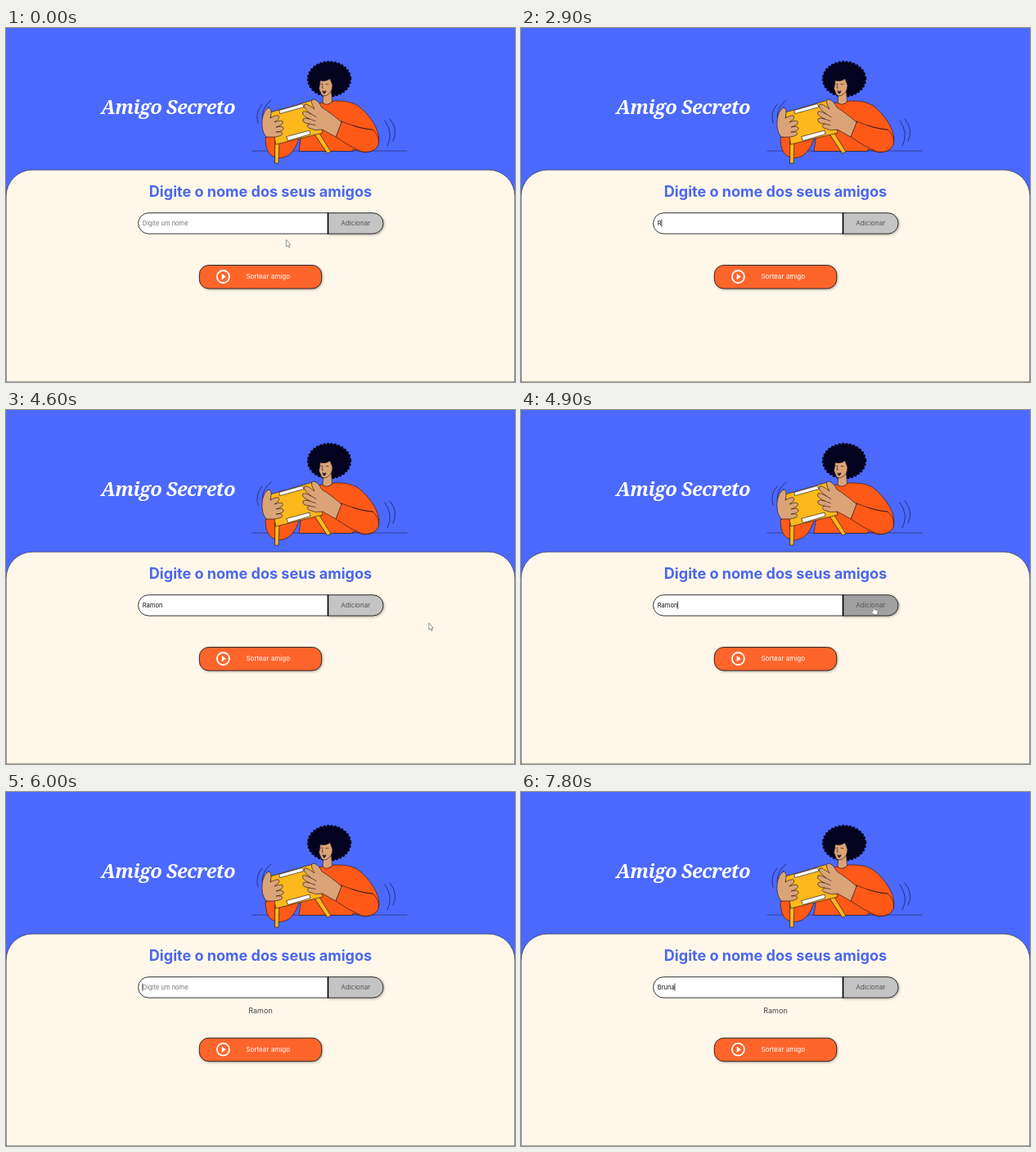
Write an HTML page that moves like this. It is 622x432 px and loops after 8 s.

```html
<!DOCTYPE html>
<html lang="pt-BR">
<head>
<meta charset="utf-8">
<title>Amigo Secreto</title>
<style>
  html, body { margin: 0; width: 100%; height: 100%; overflow: hidden; background: #4b69fd; }
  svg { display: block; width: 622px; height: 432px; }
  text { font-family: Inter, sans-serif; }
  .title { font: italic 800 23.6px "Noto Serif", serif; letter-spacing: -.6px; fill: #fff; }
  .heading { font-size: 18.05px; font-weight: 700; fill: #4a67ee; }
  .field { font-size: 7.55px; }
  .button { font-size: 8.05px; }
  .item { font-size: 9px; fill: #444; }
  .edge { stroke: #1c1c1c; stroke-width: .9; }
  .shadow { filter: drop-shadow(1px 1.5px 1.5px rgba(0, 0, 0, .3)); }
  .art { stroke: #24171f; stroke-width: .65; stroke-linejoin: round; stroke-linecap: round; }
  .line { fill: none; }
  .skin { fill: #dba477; }
  .shirt { fill: #ff5917; }
  .wood { fill: #fdb91b; }
  .hair { fill: #03031f; stroke: #03031f; }
</style>
</head>
<body>
<svg viewBox="0 0 622 432">
  <rect width="622" height="432" fill="#4b69fd"/>
  <text class="title" x="198" y="105" text-anchor="middle">Amigo Secreto</text>

  <g class="art">
    <path class="line" d="M301 150H490" stroke="#1c2663"/>
    <path class="line" stroke="#101545" d="M308 116Q304 103 313 93M313 110Q313 96 324 88M463 113Q474 128 466 144M469 111Q480 124 473 138"/>
    <!-- body and far sleeve -->
    <path class="shirt" d="M358 150L364 108Q374 93 386 91Q393 95 400 89Q418 88 429 94Q442 103 451 119Q458 133 455 141Q452 151 438 152L424 148V150Z"/>
    <path class="shirt" d="M317 134Q317 151 325 156Q334 161 344 156Q352 151 357 138L361 128L330 130Z"/>
    <!-- head -->
    <ellipse class="hair" cx="395" cy="62.300" rx="25.300" ry="20.300"/>
    <ellipse class="hair" cx="395" cy="62.300" rx="25.300" ry="20.300" fill="none" stroke-width="4" stroke-dasharray="0 4.4"/>
    <path class="skin" d="M388 79L387 91Q392 96 398.500 90L397.500 76Z"/>
    <path class="skin" d="M384 64Q390 66 396 62L399 70Q399 79 391 82.500Q386 84 384.500 79L382.500 74Q383.500 70 384 64Z"/>
    <path class="line" d="M384.800 68.500L387 68M391 68.500L394 68.700M387 69.500L386 73L387.500 73.500"/>
    <path d="M387 77Q389 78 391 76.800Q390.500 80 388.500 80Z" fill="#24171f"/>
    <!-- stool -->
    <path class="wood" d="M329 138L334 137L333 165H329ZM377 129L382 127L397 151L393 153Z"/>
    <path class="wood" d="M323 103L375 88L387 128L330 142Z"/>
    <path d="M334 100.500L362 92.500L364 96.500L335 104.500ZM343 132.500L371 125L372 129.500L345 137.500Z" fill="#fff"/>
    <!-- hands -->
    <path class="skin" d="M321 97Q314 101 313 113Q312 126 318 133L328 133Q337 132 338 129Q337 126 330 127Q340 126 339 122Q338 119 330 121Q340 118 338 114Q336 112 328 115Q336 110 333 107Q330 106 323 110Q326 98 321 97Z"/>
    <path class="shirt" d="M410 114L403 133Q420 145 435 151Q450 153 455 143Q457 131 448 124Q433 123 410 114Z"/>
    <path class="line" d="M424 119Q434 123 448 124"/>
    <path class="skin" d="M410 115L403 133Q394 128 387 124Q378 126 370 122Q366 119 371 117Q361 116 363 111Q365 109 371 111Q360 106 363 102Q366 101 373 105Q362 97 365 93Q368 92 377 99Q371 89 375 87Q381 87 386 97Q396 103 410 115Z"/>
    <path class="line" d="M371 117L378 118.500M371 111L378 113.500M373 105L379 108.500"/>
  </g>

  <path d="M.2 433V205.200A32 32 0 0 1 32.200 173.200H589.800A32 32 0 0 1 621.800 205.200V433" fill="#fff8ea" stroke="#30303c" stroke-width=".65"/>
  <path d="M0 431.700H622" stroke="#555" stroke-width=".6"/>
  <text class="heading" x="311" y="206" text-anchor="middle">Digite o nome dos seus amigos</text>

  <path class="edge" d="M394 225.700H174.300A12.700 12.700 0 0 0 174.300 251.100H394Z" fill="#fff"/>
  <path id="addButton" class="edge shadow" d="M393.500 225.700H448.300A12.700 12.700 0 0 1 448.300 251.100H393.500Z"/>
  <path d="M393.500 225.500V251.300" stroke="#000" stroke-width="1.600"/>
  <text class="button" x="427.200" y="241.200" text-anchor="middle" fill="#545454">Adicionar</text>
  <text id="field" class="field" x="166.800" y="241"></text>
  <path id="caret" d="M0 233.500V242.800" stroke="#222" stroke-width=".8"/>

  <text id="item" class="item" x="311" y="270.300" text-anchor="middle">Ramon</text>
  <g id="draw">
    <rect class="edge shadow" x="236.300" y="289.500" width="149.400" height="28.500" rx="11.500" fill="#fe652b"/>
    <circle cx="265.400" cy="303.500" r="7.500" fill="none" stroke="#fff" stroke-width="1.800"/>
    <path d="M263.700 299.800V307.200L268.900 303.500Z" fill="#fff"/>
    <text class="button" x="320.200" y="306.300" text-anchor="middle" fill="#fff">Sortear amigo</text>
  </g>

  <path id="arrow" d="M.3 .3V9L2.200 7.300L3.600 10L4.700 9.500L3.500 6.800L5.700 6.600Z" fill="#fff" stroke="#555" stroke-width=".6"/>
  <path id="hand" d="M1.300 .4Q2.300 -.2 2.600 1L3 3.800L6.300 4.600Q7.200 5 7 6L6.300 9.800H2.400L-.9 6.500Q-.8 5.300 .6 5.800L1.100 6.200Z" fill="#fff" stroke="#666" stroke-width=".6"/>
</svg>
<script>
  const LOOP = 8000, ADDED = 5000;
  const $ = id => document.getElementById(id);

  // Each step: start time, then the value held until the next step.
  const typed = [
    [0, ''], [2900, 'R'], [3200, 'Ra'], [3400, 'Ram'], [3500, 'Ramo'], [3600, 'Ramon'], [ADDED, ''],
    [7100, 'B'], [7300, 'Br'], [7500, 'Bru'], [7600, 'Brun'], [7800, 'Bruna']
  ];
  const caretOn = [
    [0, false], [1300, true], [1800, false], [2300, true], [4200, false], [4700, true], [ADDED, false],
    [5800, true], [6300, false], [6800, true]
  ];
  const pointer = [
    [0, ['arrow', 342, 258]], [100, null],
    [4400, ['arrow', 551, 322]], [4500, ['arrow', 538, 288]], [4600, ['arrow', 516.5, 259.5]],
    [4700, ['arrow', 479, 253]], [4800, ['hand', 440, 243]], [4900, ['hand', 429, 240]],
    [ADDED, ['hand', 426.5, 239.5]], [5100, null]
  ];
  const at = (steps, t) => steps.findLast(([start]) => start <= t)[1];
  const show = (id, on) => $(id).setAttribute('visibility', on ? 'visible' : 'hidden');
  const move = (id, x, y) => $(id).setAttribute('transform', `translate(${x} ${y})`);

  function render(t) {
    const name = at(typed, t), cursor = at(pointer, t), field = $('field');
    const content = name || 'Digite um nome';
    if (field.textContent !== content) field.textContent = content;
    field.setAttribute('fill', name ? '#111' : '#757575');
    show('caret', at(caretOn, t));
    move('caret', 166.8 + (name ? field.getComputedTextLength() + .2 : 0), 0);

    show('item', t >= ADDED);
    move('draw', 0, t >= ADDED ? 10.7 : 0);

    for (const kind of ['arrow', 'hand']) show(kind, cursor?.[0] === kind);
    if (cursor) move(...cursor);
    $('addButton').setAttribute('fill', cursor?.[0] === 'hand' ? '#a0a0a0' : '#c4c4c4');
  }

  const start = performance.now();
  function tick() {
    render((performance.now() - start) % LOOP);
    requestAnimationFrame(tick);
  }
  tick();
</script>
</body>
</html>
```
